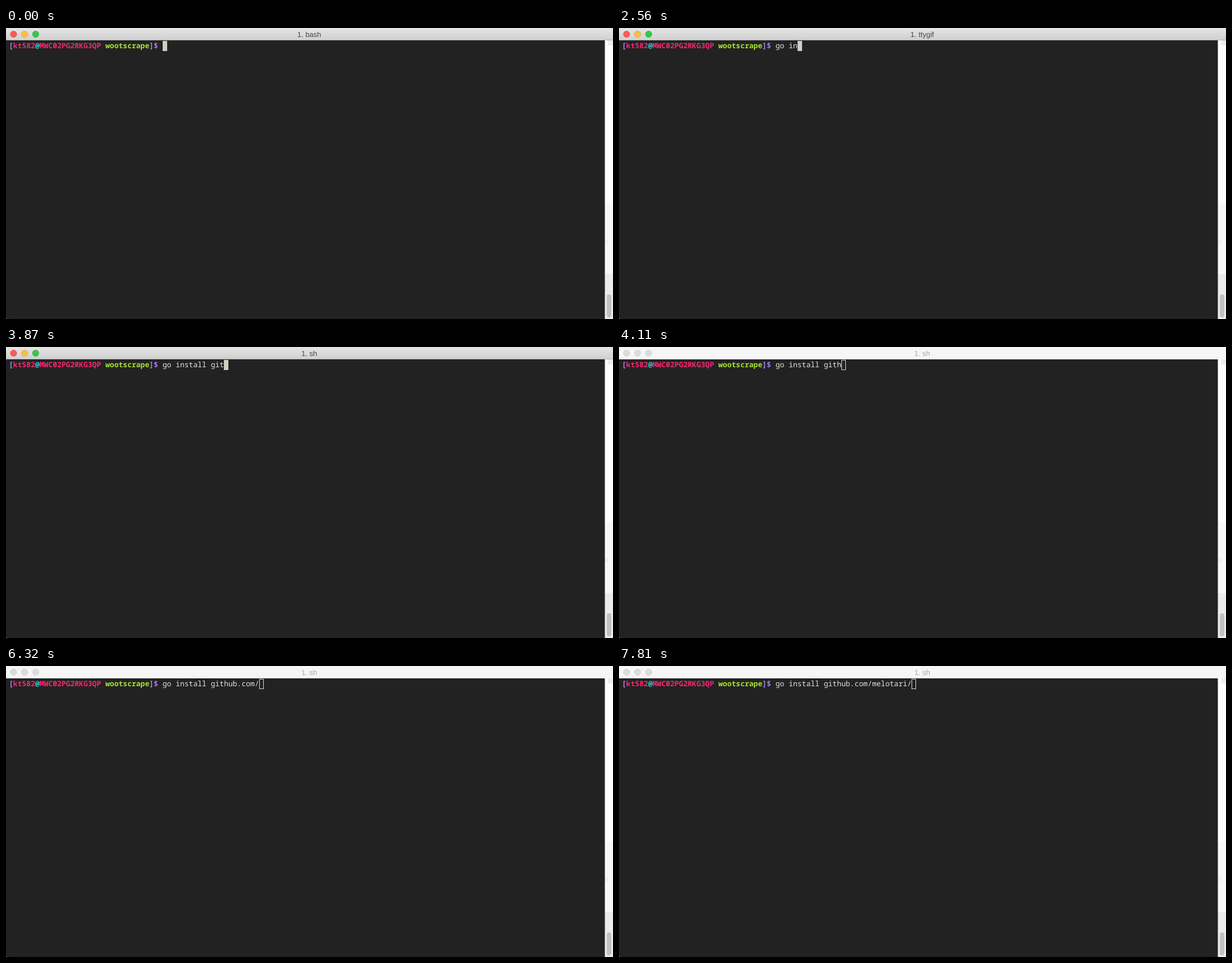
Animation of 1081x518 px, one loop 8 s. Source, as an HTML page:

```html
<!DOCTYPE html>
<html lang="en">
<head>
<meta charset="utf-8">
<title>Terminal</title>
<style>
  html, body { margin: 0; width: 100%; height: 100%; overflow: hidden; background: #fff; }
  svg { display: block; width: 1081px; height: 518px; }
  text { white-space: pre; text-rendering: geometricPrecision; }
  .line { font: 500 13.04px "Noto Sans Mono", "DejaVu Sans Mono", monospace; fill: #e4e4da; }
  .prompt { font-weight: 700; }
  .bracket { fill: #ae81ff; }
  .user { fill: #f92672; }
  .at { fill: #2fdbe6; }
  .dir { fill: #a6e22e; }
  #title { font: 13px "Liberation Sans", Arial, sans-serif; text-anchor: middle; fill: #464646; }
  #bar { fill: url(#chrome); }
  #cursor { fill: #cfcfc2; }
  .inactive #bar { fill: #f6f6f6; }
  .inactive #edge { display: none; }
  .inactive #title { fill: #a8a8a8; }
  .inactive #lights circle { fill: #dcdcdc; stroke: #cfcfcf; }
  .inactive #cursor { fill: none; stroke: #dcdcd2; }
</style>
</head>
<body>
<svg id="stage" viewBox="0 0 1081 518">
  <defs>
    <linearGradient id="chrome" x2="0" y2="1">
      <stop offset="0" stop-color="#e6e5e6"/>
      <stop offset="1" stop-color="#d0cfd0"/>
    </linearGradient>
  </defs>
  <rect width="1081" height="518" fill="#fff"/>

  <g id="scrollbar">
    <rect x="1066" y="21" width="15" height="497" fill="#fdfdfd"/>
    <rect x="1066" y="312" width="15" height="126" fill="#f8f7f7"/>
    <rect x="1066" y="438" width="15" height="80" fill="#ecebeb"/>
    <rect x="1072" y="22" width="9" height="9" fill="#eeecee"/>
    <rect x="1066" y="376" width="6" height="7" fill="#efeeee"/>
    <rect x="1070" y="474" width="8" height="41" rx="4" fill="#c1c1c1"/>
  </g>
  <path d="M0 22H1066.5V518H2Q0 518 0 516Z" fill="#222"/>

  <rect id="bar" width="1081" height="22"/>
  <rect id="edge" y="21" width="1081" height="1" fill="#b5b4b5"/>
  <g id="lights" stroke-width=".8">
    <circle cx="13.5" cy="11" r="5.6" fill="#fc5b57" stroke="#df4744"/>
    <circle cx="33" cy="11" r="5.6" fill="#fdbe41" stroke="#de9f34"/>
    <circle cx="52.8" cy="11" r="5.6" fill="#34c84a" stroke="#27aa35"/>
  </g>
  <text id="title" x="540" y="15.5"></text>

  <text class="line" x="5" y="36"><tspan class="prompt"><tspan class="bracket">[</tspan><tspan class="user">kt582</tspan><tspan class="at">@</tspan><tspan class="user">MWC02PG2RKG3QP</tspan> <tspan class="dir">wootscrape</tspan><tspan class="bracket">]$</tspan></tspan> <tspan id="typed"></tspan></text>
  <rect id="cursor"/>
</svg>
<script>
const DURATION = 8000;
const COMMAND = "go install github.com/melotari/";
const CELL = 7.824, LEFT = 5, PROMPT_LENGTH = 35;
const BLUR_TIME = 4110;

// One time per typed character.
const KEY_TIMES = [
  1420, 1880, 2080, 2270, 2560, 2660, 2740, 2820, 2900, 3040, 3170,
  3590, 3750, 3870, 4110, 4280, 4420, 5020, 5230, 5340, 5580, 6320,
  6690, 6790, 6900, 7080, 7180, 7280, 7370, 7470, 7810
];
const TITLES = [
  [0, "bash"], [1880, "osascript"], [2560, "ttygif"],
  [2740, "osascript"], [3040, "sh"]
];

const byId = id => document.getElementById(id);
const stage = byId("stage"), title = byId("title");
const typed = byId("typed"), cursor = byId("cursor");

function setBox(element, box) {
  for (const name in box) element.setAttribute(name, box[name]);
}

function render(time) {
  const count = KEY_TIMES.filter(key => key <= time).length;
  const inactive = time >= BLUR_TIME;
  const x = Math.round(LEFT + (PROMPT_LENGTH + count) * CELL);

  typed.textContent = COMMAND.slice(0, count);
  title.textContent = "1. " + TITLES.filter(([from]) => from <= time).pop()[1];
  stage.classList.toggle("inactive", inactive);
  setBox(cursor, inactive
    ? { x: x + 0.5, y: 23.5, width: 7, height: 17 }
    : { x, y: 23, width: 8, height: 18 });
}

const start = performance.now();
function tick() {
  render((performance.now() - start) % DURATION);
  requestAnimationFrame(tick);
}
tick();
</script>
</body>
</html>
```
